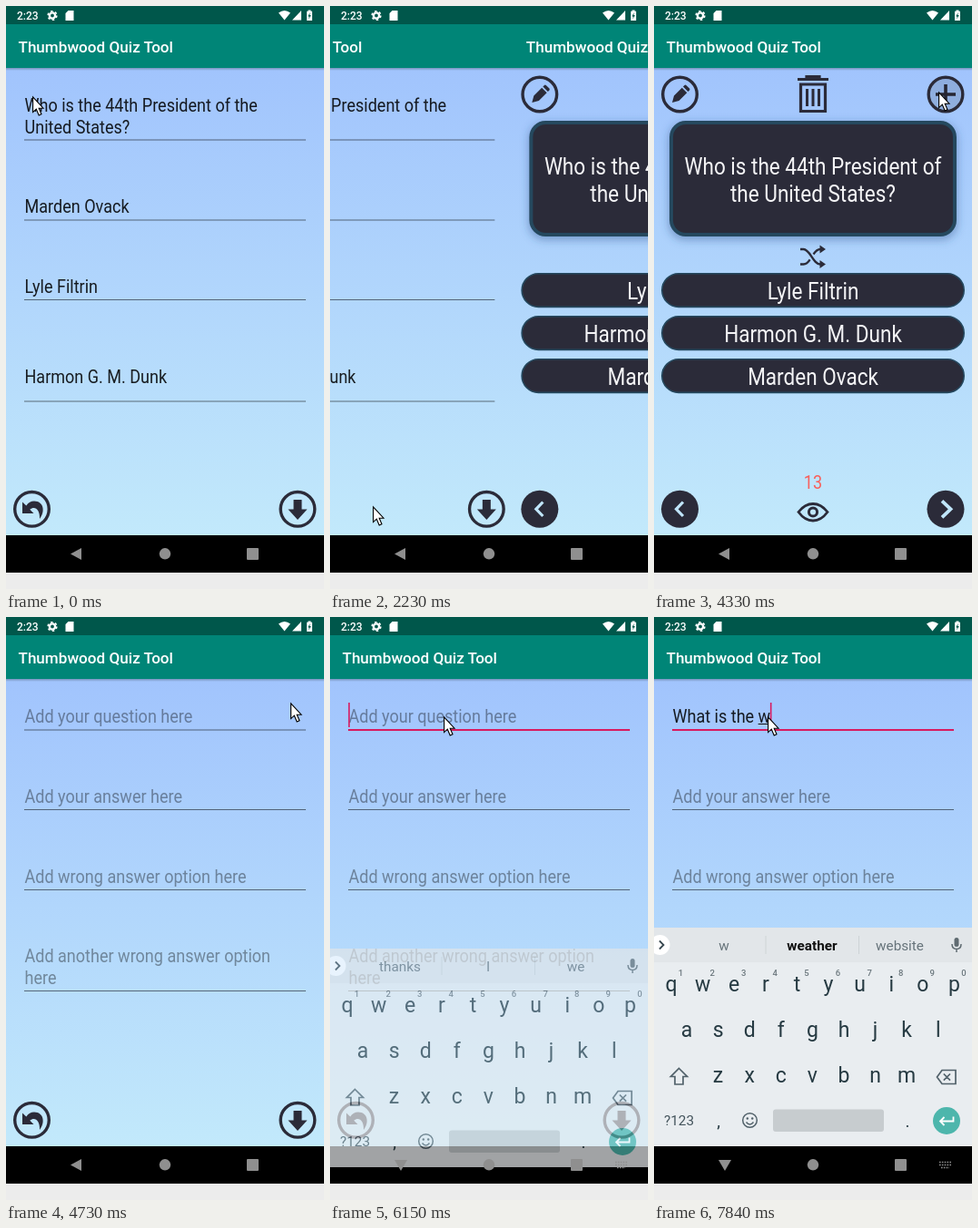
Recreate the animation shown at these times as an HTML page. Size 350 by 640 pixels, loop 7.99 s.

```html
<!DOCTYPE html>
<html lang="en">
<head>
<meta charset="utf-8">
<title>Study cards</title>
<style>
html, body { margin: 0; width: 100%; height: 100%; overflow: hidden; background: #ececec; }
svg { display: block; width: 350px; height: 640px; }
text { font-family: Roboto, sans-serif; white-space: pre; }
</style>
</head>
<body>
<svg id="stage" viewBox="0 0 350 640" xmlns="http://www.w3.org/2000/svg"></svg>
<script>
const LOOP = 7990, WIDTH = 351, NARROW = 0.88;
const INK = '#2b2b39', RIM = '#25485e', PINK = '#d81b60', KEY = '#263a42';
const TITLE = 'Thumbwood Quiz Tool';
const ANSWER = 'Marden Ovack', WRONG = ['Lyle Filtrin', 'Harmon G. M. Dunk'];

// ---- drawing helpers
const text = (x, y, s, size, o = {}) =>
  `<text ${o.id ? `id="${o.id}"` : ''} transform="translate(${x} ${y}) scale(${o.narrow ? NARROW : 1} 1)"
    font-size="${size}" fill="${o.fill || '#fff'}" font-weight="${o.weight || 400}"
    text-anchor="${o.mid ? 'middle' : 'start'}">${s}</text>`;
const path = (d, o = '') => `<path d="${d}" ${o}/>`;
const line = (d, color, w, o = '') => path(d, `fill="none" stroke="${color}" stroke-width="${w}" ${o}`);
const disc = (x, y, r, fill, o = '') => `<circle cx="${x}" cy="${y}" r="${r}" fill="${fill}" ${o}/>`;
const rect = (x, y, w, h, fill, o = '') => `<rect x="${x}" y="${y}" width="${w}" height="${h}" fill="${fill}" ${o}/>`;
const ring = (x, y) => disc(x, y, 18.8, 'none', `stroke="${INK}" stroke-width="3.4"`);
const group = (id, body, o = '') => `<g id="${id}" ${o}>${body}</g>`;

const entry = (y, s) => text(20.5, y, s, 20.5, { narrow: 1, fill: 'rgba(0,0,0,.87)' });
const hint = (y, s, id) => text(20.5, y, s, 20.5, { narrow: 1, fill: 'rgba(0,0,0,.38)', id });
const rule = y => rect(20, y, 310, 1, 'rgba(0,0,0,.52)');
const heading = text(13.5, 51, TITLE, 17.1, { weight: 500 });

const formIcons = ring(28.5, 552.3) + ring(321, 552.3) +
  path('M18 544.5V557H30.500L26.300 552.8C31 548.500 37.500 551.500 37 563C43.500 555 41.500 543.500 31 543.500C27.500 543.500 24.500 545.200 22.300 548.500Z', `fill="${INK}"`) +
  path('M316.500 542H325.500V552.500H331.500L321 564L310.500 552.500H316.500Z', `fill="${INK}"`);

function editPage() {
  return heading + entry(115.5, 'Who is the 44th President of the') + entry(139.5, 'United States?') +
    entry(227, ANSWER) + entry(315, WRONG[0]) + entry(414, WRONG[1]) +
    [146.5, 234.5, 322, 433.5].map(rule).join('') + formIcons;
}

function addPage() {
  return heading + hint(115.5, 'Add your question here', 'ask') + hint(203.5, 'Add your answer here') +
    hint(291.5, 'Add wrong answer option here') + hint(379, 'Add another wrong answer option') + hint(403, 'here') +
    [123.5, 211, 299, 410].map(rule).join('') + formIcons +
    group('focus', rect(20, 123, 310, 2, PINK) +
      text(20.5, 115.5, '', 20.5, { narrow: 1, fill: 'rgba(0,0,0,.87)', id: 'typed' }) +
      rect(0, 117, 0, 1, '#111', 'id="compose"') + rect(20, 94, 1.6, 27, PINK, 'id="caret"'));
}

function cardPage() {
  const pill = (y, s) => rect(8.8, y + .8, 332.4, 36.6, INK, `rx="18.3" stroke="${RIM}" stroke-width="1.6"`) +
    text(175, y + 29, s, 25.6, { narrow: 1, mid: 1, fill: '#f4f4f6' });
  const pencil = path('M20 106L22 98.500L30.800 89.700L36.300 95.200L27.500 104ZM32 88.500L33.600 86.900Q34.500 86.200 35.400 86.900L39.100 90.600Q39.800 91.500 39.100 92.400L37.500 94Z', `fill="${INK}"`);
  const bin = line('M158 80.5H192M168 79.500V77.500H182V79.500', INK, 3.2) +
    line('M161.500 86H188.500V115.500H161.500Z', INK, 3.2) + line('M168.500 91V110M175 91V110M181.500 91V110', INK, 3);
  const shuffle = line('M161 267H164.500C172 267 175 283.500 183 283.500H185M161 283.500H164.500C168 283.500 170 281 171.600 278.400M175.500 272.500C177.500 269.500 179.500 267 183 267H185', INK, 2.3) +
    path('M182.500 262.500L189 267L182.500 271.500ZM182.500 279L189 283.500L182.500 288Z', `fill="${INK}"`);
  const eye = line('M159 555.500Q166 546.500 175 546.500T191 555.500Q184 565 175 565T159 555.500Z', INK, 2.8) +
    disc(175, 555.5, 4.6, 'none', `stroke="${INK}" stroke-width="3"`);
  return heading + ring(28.5, 97) + ring(321, 97) + pencil +
    line('M310 97H332M321 86V108', INK, 3.6) + disc(321, 97, 0, 'rgba(0,0,0,.12)', 'id="ripple"') + bin +
    rect(16, 128, 318, 129, 'rgba(50,85,140,.42)', 'rx="18" filter="url(#soft)"') +
    rect(19, 128, 312, 123, INK, `rx="16" stroke="${RIM}" stroke-width="4"`) +
    text(175, 185, 'Who is the 44th President of', 25.6, { narrow: 1, mid: 1, fill: '#f4f4f6' }) +
    text(175, 215, 'the United States?', 25.6, { narrow: 1, mid: 1, fill: '#f4f4f6' }) +
    shuffle + pill(293, WRONG[0]) + pill(340, WRONG[1]) + pill(387, ANSWER) +
    text(175, 530, '15', 20.5, { narrow: 1, mid: 1, fill: '#f8605c', id: 'count' }) + eye +
    disc(28.5, 552.3, 20.5, INK) + disc(321, 552.3, 20.5, INK) +
    line('M32 544.500L24.500 552.300L32 560', '#c0e6fb', 3.2) + line('M317 543.300L326.500 552.300L317 561.300', '#c0e6fb', 3.8);
}

function keyboard() {
  const step = 34.6;
  const row = (keys, x, y) => [...keys].map((k, i) => text(x + i * step, y, k, 23, { mid: 1, fill: KEY })).join('');
  const digits = [...'1234567890'].map((k, i) => text(29.5 + i * step, 394, k, 9.5, { mid: 1, fill: '#6b777d', weight: 500 })).join('');
  return rect(0, 341, 350, 240, '#e9edf0') + rect(0, 341, 350, 38, '#e2e6e9') +
    disc(6.5, 360, 11, '#fff') + line('M6 355.500L10.500 360L6 364.500', '#37474f', 1.8) +
    rect(122.5, 350, 1, 20, '#cdd3d6') + rect(225, 350, 1, 20, '#cdd3d6') +
    [77, 174, 270.5].map((x, i) => text(x, 365.5, '', 15.3, { mid: 1, id: 'tip' + i })).join('') +
    rect(330.5, 352, 5, 10, '#5f6b71', 'rx="2.5"') + line('M328 359Q328 364.500 333 364.500T338 359M333 364.500V368', '#5f6b71', 1.5) +
    row('qwertyuiop', 19, 411) + digits + row('asdfghjkl', 36, 461) + row('zxcvbnm', 70.5, 511) +
    line('M27.500 495.500L36.500 504.500H32V513H23V504.500H18.500Z', '#51616a', 1.7) +
    line('M317 497.500H332V512.500H317L311.500 505ZM318.800 501.500L326 508.700M326 501.500L318.800 508.700', '#51616a', 1.7) +
    text(27.5, 558, '?123', 15.3, { mid: 1, fill: '#44545c' }) +
    text(71, 560, ',', 19, { mid: 1, fill: KEY }) + text(279, 560, '.', 19, { mid: 1, fill: KEY }) +
    disc(105.5, 552.5, 7.8, 'none', 'stroke="#51616a" stroke-width="1.5"') +
    disc(102.8, 550.5, 1.2, '#51616a') + disc(108.2, 550.5, 1.2, '#51616a') + line('M101.500 554.500Q105.500 559.500 109.500 554.500', '#51616a', 1.5) +
    rect(131, 540.5, 122, 24.5, '#c7cccf', 'rx="3"') + disc(322, 553, 15, '#4db6ac') +
    line('M329.500 548.500V553.500H315.500M319.500 549L315 553.500L319.500 558', '#fff', 1.8);
}

const statusBar = rect(0, 0, 350, 20, '#00574b') + text(12, 14.7, '2:23', 12, { weight: 500 }) +
  disc(51, 10.5, 3.1, 'none', 'stroke="#fff" stroke-width="2.4"') +
  disc(51, 10.5, 4.8, 'none', 'stroke="#fff" stroke-width="1.6" stroke-dasharray="2.5 2.53"') +
  path('M68.500 5H74.500V16H65.500V8ZM300 7.500Q306.500 2.500 313 7.500L306.500 15.500ZM315 15.500H325V5ZM332.500 4.500H335.500V5.700H337V16H331V5.700H332.500Z', 'fill="#fff"') +
  path('M334.800 7L332.200 11.500H333.800L333.200 14.500L335.800 10H334.200Z', 'fill="#00574b"');

const navIcons = path('M71 601.500L83 595V608Z', 'fill="#8f8f8f" id="back"') +
  disc(175, 601.3, 6.2, '#8f8f8f') + rect(265, 595, 13, 13, '#8f8f8f', 'rx="1"') +
  line('M314 598.500H327M314 601.500H327M316 604.500H325', '#8f8f8f', 1.6, 'stroke-dasharray="1.6 1.25" id="board"');

document.getElementById('stage').innerHTML =
  `<defs><linearGradient id="sky" x1="0" y1="0" x2="0" y2="1">
    <stop stop-color="#a1c4fd"/><stop offset="1" stop-color="#c2e9fb"/></linearGradient>
    <linearGradient id="shade" x1="0" y1="0" x2="0" y2="1">
    <stop stop-opacity=".25"/><stop offset="1" stop-opacity="0"/></linearGradient>
    <filter id="soft" x="-10%" y="-20%" width="120%" height="140%"><feGaussianBlur stdDeviation="5"/></filter></defs>` +
  rect(0, 0, 350, 640, '#ececec') + rect(0, 68, 350, 513, 'url(#sky)') + rect(0, 20, 350, 48, '#008577') +
  rect(0, 68, 350, 3, 'url(#shade)') +
  group('edit', editPage()) + group('card', cardPage()) + group('add', addPage()) +
  statusBar + rect(0, 581, 350, 41, '#000') + group('keys', keyboard()) + navIcons +
  path('M.6.8V17.600L4.300 14.200L7.200 21L10 19.800L7.200 13.200H12Z', 'id="mouse" fill="#fff" stroke="#000" stroke-width="1.1"');

const el = {};
document.querySelectorAll('[id]').forEach(n => el[n.id] = n);

// ---- timing
const run = (from, to, n) => Array.from({ length: n }, (_, i) => from + (to - from) * i / (n - 1));
const TICKS = [0, ...run(530, 770, 3), ...run(920, 1160, 3), ...run(1310, 1550, 3), 1800, 2230,
  ...run(2380, 2860, 5), 3010, 3160, 3280, ...run(4090, 4330, 3), 4580, 4730, 5100, 5250,
  ...run(5400, 5640, 3), ...run(5790, 6150, 4), 6300, 6610, 6760, 6910, 7060, 7210, ...run(7360, 7840, 5)];

// time, x, y of the pointer tip
const MOUSE = [[410, 29, 99], [770, 168, 271], [1160, 263, 491], [1310, 266, 500], [1550, 49, 548], [1800, 47, 549],
  [2230, 47, 549], [3010, 291, 92], [3280, 313, 94], [4980, 313, 94], [5100, 298, 96], [5250, 234, 104],
  [5640, 139, 129], [6030, 125, 109]];

// time, typed text, suggestions
const TYPING = [
  [0, '', 'thanks', 'I', 'we'],
  [6760, 'W', 'W', 'What', 'We'],
  [6910, 'Wh', 'Wh', 'What', 'When'],
  [7060, 'What', 'What', 'What', 'Whatever'],
  [7210, 'What ', 'is', 'do', 'are'],
  [7360, 'What i', 'i', 'is', 'it'],
  [7480, 'What is ', 'the', 'your', 'a'],
  [7600, 'What is t', 't', 'the', 'this'],
  [7720, 'What is the', 'the', 'the', 'they'],
  [7840, 'What is the w', 'w', 'weather', 'website']];

const clamp = v => Math.max(0, Math.min(1, v));
const latest = (list, t, at) => list.filter(v => at(v) <= t).pop();
const slide = (t, start) => WIDTH * (.5 + .5 * Math.cos(Math.PI * clamp((t - start) / 266)));
const show = (n, on) => n.setAttribute('visibility', on ? 'inherit' : 'hidden');
const move = (n, x, y = 0) => n.setAttribute('transform', `translate(${x} ${y})`);

function pointer(t) {
  const i = MOUSE.findIndex(k => k[0] > t);
  if (i === 0) return MOUSE[0].slice(1);
  if (i < 0) return MOUSE[MOUSE.length - 1].slice(1);
  const a = MOUSE[i - 1], b = MOUSE[i], p = (t - a[0]) / (b[0] - a[0]);
  return [a[1] + (b[1] - a[1]) * p, a[2] + (b[2] - a[2]) * p];
}

function typing(t) {
  const [, s, ...tips] = latest(TYPING, t, v => v[0]);
  const width = str => {
    el.typed.textContent = str;
    return str ? el.typed.getComputedTextLength() * NARROW : 0;
  };
  const before = width(s.slice(0, s.lastIndexOf(' ') + 1)), full = width(s);
  el.compose.setAttribute('x', 20.5 + before);
  el.compose.setAttribute('width', Math.max(0, full - before));
  el.caret.setAttribute('x', 20.2 + full);
  show(el.caret, t < 6610 || t >= 6760);
  show(el.ask, !s);
  const bold = s && !s.endsWith(' ');
  tips.forEach((tip, i) => {
    const n = el['tip' + i], main = bold && i === 1;
    n.textContent = tip;
    n.setAttribute('font-weight', main ? 700 : 400);
    n.setAttribute('fill', main ? '#111' : '#66737a');
  });
}

function draw(time) {
  const t = latest(TICKS, time, v => v);
  const first = slide(t, 2110), second = slide(t, 4460);
  move(el.edit, first - WIDTH);
  move(el.card, t < 4460 ? first : second - WIDTH);
  move(el.add, second);
  el.count.textContent = t < 3010 ? 15 : t < 4090 ? 14 : 13;
  el.ripple.setAttribute('r', 17 * clamp((t - 3970) / 240));

  const p = clamp((t - 6030) / 270), rise = 1 - (1 - p) ** 2;
  el.keys.setAttribute('opacity', rise);
  move(el.keys, 0, Math.round(75 * (1 - rise)));
  show(el.focus, t >= 6150);
  show(el.board, t >= 6150);
  el.back.setAttribute('d', t >= 6150 ? 'M71 596H85L78 608Z' : 'M71 601.500L83 595V608Z');
  typing(t);
  move(el.mouse, ...pointer(t));
}

function loop(now) {
  draw(now % LOOP);
  requestAnimationFrame(loop);
}
draw(0);
requestAnimationFrame(loop);
</script>
</body>
</html>
```
